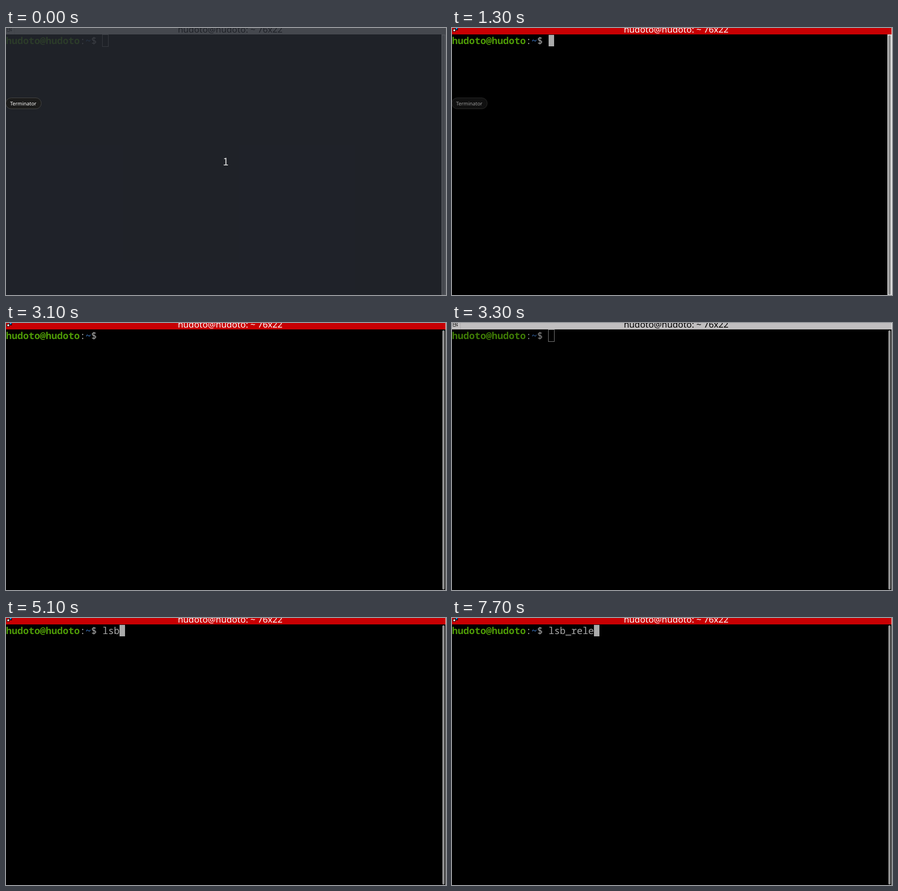
Animation of 961x583 px, one loop 8000 ms. Source, as an HTML page:

```html
<!DOCTYPE html>
<html lang="en">
<head>
<meta charset="utf-8">
<title>Terminal</title>
<style>
  html, body { margin: 0; width: 100%; height: 100%; overflow: hidden; background: #000; }
  svg { display: block; width: 961px; height: 583px; text-rendering: geometricPrecision; --fg: #aaa; --user: #4e9a06; --dir: #3465a4; --bar: #c80003; --title: #fff; }
  svg.idle { --fg: #888; --user: #3e7b05; --dir: #2a5183; --bar: #c0bebf; --title: #000; }
  text { white-space: pre; }
  .mono { font: 20.667px "Noto Sans Mono", "DejaVu Sans Mono", monospace; fill: var(--fg); }
  .user { font-weight: 700; fill: var(--user); }
  .dir { font-weight: 700; fill: var(--dir); }
  .title { font: 500 19.2px "Noto Sans", "Open Sans", sans-serif; fill: var(--title); text-anchor: middle; }
  .tip { font: 11px "Noto Sans", "Open Sans", sans-serif; fill: #fff; }
  .count { font: 23px "Noto Sans CJK SC", "Noto Sans CJK JP", "DejaVu Sans", sans-serif; fill: #dcdcdc; text-anchor: middle; }
  .on, .idle .off { display: none; }
  .idle .on { display: inline; }
</style>
</head>
<body>
<svg id="stage" viewBox="0 0 961 583">
  <rect width="961" height="583"/>
  <rect width="960" height="14" fill="var(--bar)"/>
  <g class="on">
    <path d="M18.5 0V13" stroke="#aaa8a9"/>
    <path d="M2.5 -1V7.5H7.5M2.5 2.5H11.5V-1M7.5 -1V7.5M9 5.5h4M11 3.5v4" fill="none" stroke="#222"/>
  </g>
  <g class="off">
    <rect x="2" y="2" width="6" height="6"/>
    <rect x="3" y="3" width="4" height="4" fill="#eee"/>
    <rect x="7" y="-1" width="6" height="6"/>
    <rect x="8" y="0" width="4" height="3" fill="#2a7fd4"/>
  </g>
  <text class="title" x="489.5" y="10">hudoto@hudoto: ~ 76x22</text>

  <rect x="960" y="0" width="1" height="583" fill="#f2f2f2"/>
  <rect id="trough" x="951" y="14" width="9" height="569" fill="#f2f2f2"/>
  <rect id="thumb" x="953" y="16" width="5" height="566" rx="2.5"/>

  <text class="mono" x="0" y="35"><tspan class="user">hudoto@hudoto</tspan>:<tspan class="dir">~</tspan>$</text>
  <text class="mono" id="typed" x="210.8" y="35"></text>
  <rect id="block" y="15" width="12" height="25" fill="#aaa"/>
  <rect class="on" x="210.5" y="14.5" width="13" height="26" fill="none" stroke="#888"/>

  <g id="countdown">
    <rect width="961" height="583" fill="#272b33" fill-opacity=".8"/>
    <text class="count" x="480" y="300">1</text>
  </g>
  <g id="tip">
    <rect x="-.5" y="152.5" width="77.5" height="24" rx="12" fill="#1c1c1b" stroke="#484846"/>
    <text class="tip" x="9" y="169">Terminator</text>
  </g>
</svg>
<script>
const LOOP = 8000, CELL = 12.4, PROMPT = 17;
const $ = id => document.getElementById(id);

// Each row: start time, value held until the next row.
const typing = [[0, ""], [4700, "l"], [4800, "ls"], [5100, "lsb"], [6100, "lsb_"],
  [6400, "lsb_re"], [6700, "lsb_rea"], [7200, "lsb_re"], [7500, "lsb_rel"], [7700, "lsb_rele"]];
const blink = [[0, false], [1300, true], [1900, false], [2500, true], [3100, false],
  [3400, true], [3900, false], [4500, true], [5600, false], [5800, true]];
const idle = [[0, true], [1300, false], [3300, true], [3400, false]];
const tipFade = [[0, 1], [1300, .6], [1400, .3], [1500, .1], [1600, 0]];
const troughFade = [[0, 1], [1300, .88], [1400, .45], [1500, .12], [1600, 0]];

const at = (track, t) => track.findLast(([start]) => start <= t)[1];
const show = (id, on) => $(id).setAttribute("visibility", on ? "visible" : "hidden");

function draw(t) {
  const text = at(typing, t);
  $("stage").classList.toggle("idle", at(idle, t));
  $("typed").textContent = text;
  $("block").setAttribute("x", Math.round((PROMPT + text.length) * CELL));
  $("thumb").setAttribute("fill", t < 1300 ? "#c0c0c0" : "#8c8c8c");
  $("tip").setAttribute("opacity", at(tipFade, t));
  $("trough").setAttribute("opacity", at(troughFade, t));
  show("block", at(blink, t));
  show("countdown", t < 100);
}

function tick() {
  draw(performance.now() % LOOP);
  requestAnimationFrame(tick);
}
tick();
</script>
</body>
</html>
```
